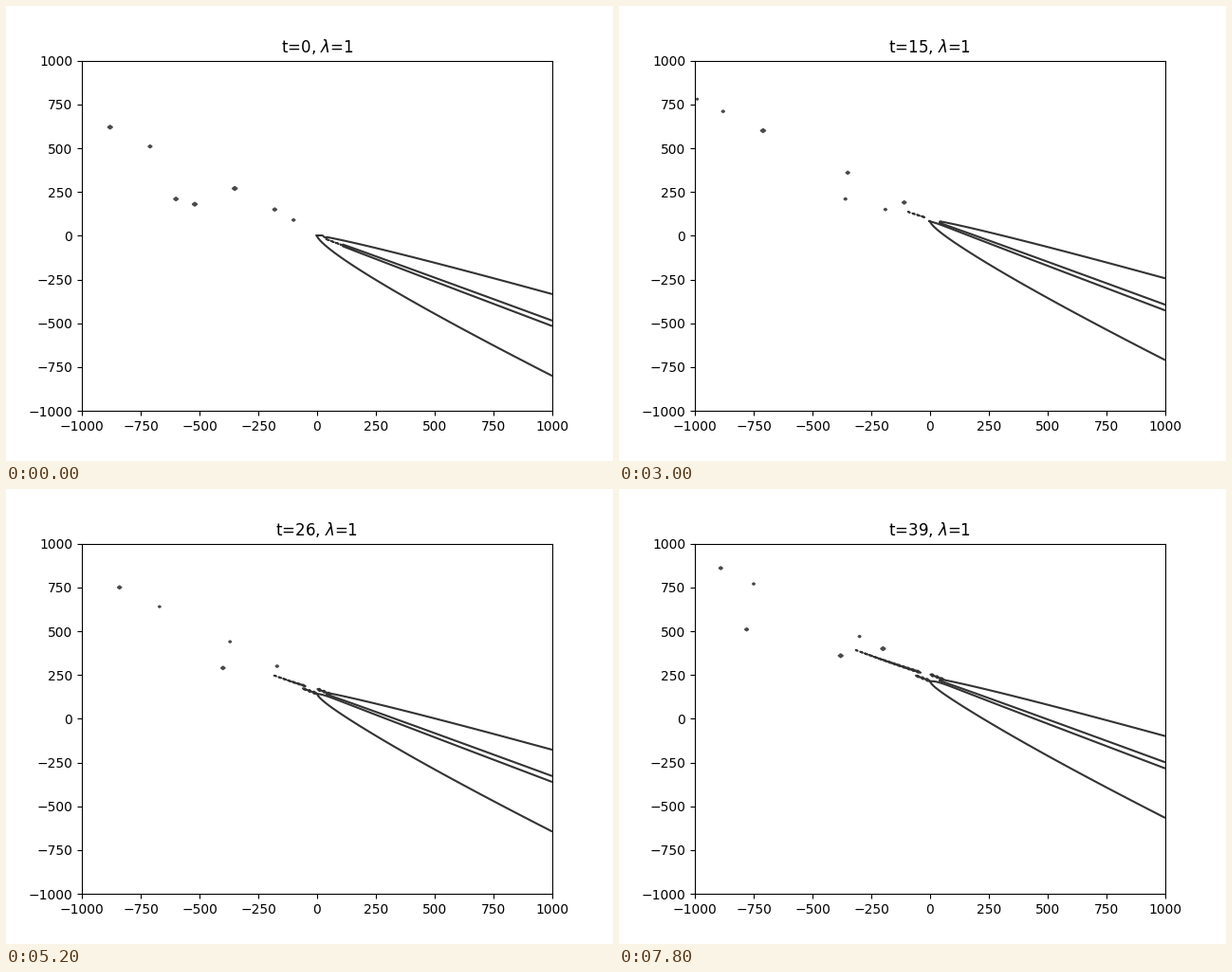
These frames come from a looping animation (640x480 px, 8000 ms). A matplotlib script:

```python
import numpy as np
import matplotlib.pyplot as plt
from matplotlib.animation import FuncAnimation
from matplotlib.collections import LineCollection, PolyCollection

STEPS, STEP_MS = 40, 200
SPEED = 6            # upward drift of the whole pattern per unit of t
GRID = 10            # sampling step of the plotted field
HIT = .17            # how close a ridge must pass to a grid point to show
INK, DOT_INK = "#333333", "#4a4a4a"

plt.rcParams["text.kerning_factor"] = 6

fig = plt.figure(figsize=(6.4, 4.8), dpi=100)
ax = fig.add_subplot()
ax.set_xlim(-1000, 1000)
ax.set_ylim(-1000, 1000)
title = ax.set_title("")
curves = LineCollection([], colors=INK, linewidths=1.5)
dashes = PolyCollection([], facecolors=INK, edgecolors=INK, linewidths=1.3)
dots = PolyCollection([], facecolors=DOT_INK, edgecolors=DOT_INK,
                      linewidths=1.4)
for layer in (curves, dashes, dots):
    ax.add_collection(layer, autolim=False)


def axis_y(x, t):
    return SPEED * t - x / 2


def diamond(x, y, size):
    r = GRID * size
    return [(x - r, y), (x, y + r), (x + r, y), (x, y - r)]


def dash(x, y, length, height):
    return [(x - length, y + length / 2), (x, y + height),
            (x + length, y - length / 2), (x, y - height)]


def branch(start, t, scale, power, sag=0, reach=1):
    """Curve leaving the axis as a power of x, lowered by sag at the tip."""
    x = start + (1000 - start) * np.linspace(0, 1, 160) ** 2
    u = np.maximum(x, 0)
    y = axis_y(x, t) + scale * (u / 1000) ** power
    return np.column_stack([x, y - sag * np.exp(-u / reach)])


def branches(t):
    """Two wedges opening to the right, joined into one while t is small."""
    early = t < 10
    gap = 15.5 + .05 * t
    sag = t / 2
    inner = max(110 - 12 * t, 40)
    low = branch(-4, t, -300, .62, sag, 100)
    high = branch(42, t, 167, .8)
    in_high = branch(inner, t, gap, .5)
    if not early:
        in_low = branch(-4, t, -gap, .5, sag, 25)
        return [np.vstack([in_low[::-1], low]),
                np.vstack([in_high[::-1], high])]
    in_low = branch(inner, t, -gap, .5)
    x = np.linspace(0, 36, 20)
    neck = np.column_stack([x, SPEED * t + 2 - 12 / (1 + np.exp(14 - x / 2))])
    return [np.vstack([low[::-1], neck, high]),
            np.vstack([in_high[::-1], in_low])]


def tail(t):
    """Dashes strung along the axis, reaching further left as t grows."""
    out = []
    near, far = min(2 * t, 45), 3 + 5.6 * t + .063 * t * t
    shift = 0 if t % 5 >= 3 else GRID / 2
    for y in np.arange(shift, 700, GRID):
        s = 2 * (y - SPEED * t)
        if t > 1 and near <= s <= far:
            close = 1 - (s - near) / (far - near)
            out.append(dash(-s, y + .25 * t * close ** 2,
                            3 + .25 * t * np.sqrt(close), 1 + .13 * t * close))
    return out


def core(t):
    """Small knots around the tip of the pattern."""
    if t < 10:
        return [dash(x, axis_y(x, t), 7, 1)
                for x in range(45 - 2 * t, 110 - 10 * t, 20)]
    out = []
    for i in range(3):
        if t > 15 + 5 * i:
            for x, lift in ((10 + 20 * i, 3 + .42 * t),
                            (-12 - 20 * i, -3 - .38 * t)):
                out.append(dash(x, axis_y(x, t) + lift, 9, 7 - i))
    return out


def ridge_hits(t):
    """Grid points that lie almost exactly on one of the two thin ridges."""
    out = []
    for s in range(100, 1000, GRID):
        upper = 95 * (s / 350) ** .693 + 2000 * t / s ** 2 - .01 * t
        lower = -.475 * s ** .82 - .06 * t - .3 + 220 / s
        for offset in (upper, lower):
            y = axis_y(-s, t) + offset
            node = GRID * round(y / GRID)
            miss = abs(y - node) / HIT
            if miss < 1:
                out.append(diamond(-s, node, .2 + .75 * np.sqrt(1 - miss)))
    return out


def draw(t):
    title.set_text(rf"t={t}, $\lambda$=1")
    curves.set_segments(branches(t))
    dashes.set_verts(tail(t) + core(t))
    dots.set_verts(ridge_hits(t))
    return title, curves, dashes, dots


anim = FuncAnimation(fig, draw, frames=STEPS, interval=STEP_MS,
                     init_func=lambda: draw(0), repeat=True, repeat_delay=0)
plt.show()
```
